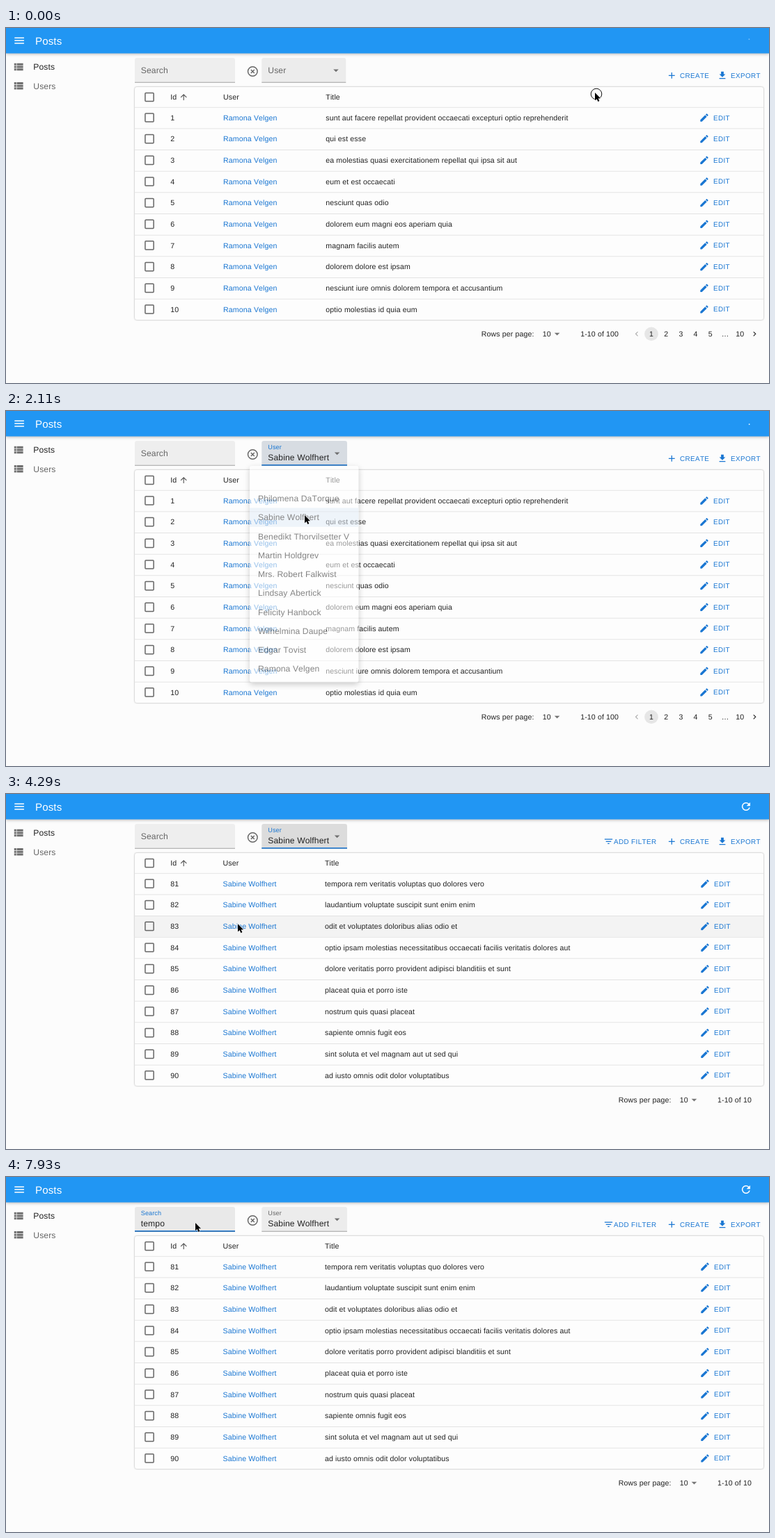
An HTML page that plays this animation: 1096x511 px, repeating every 8 s.

```html
<!DOCTYPE html>
<html lang="en">
<head>
<meta charset="utf-8">
<title>Posts list</title>
<style>
  html, body { margin: 0; width: 100%; height: 100%; overflow: hidden; background: #fcfcfc; }
  svg { display: block; width: 100%; height: 100%; }
  text { font-family: "Liberation Sans", Arial, sans-serif; fill: #212121; white-space: pre;
         text-rendering: geometricPrecision; font-kerning: none; }
  .cell { font-size: 10.6px; letter-spacing: .114px; }
  .body { font-size: 12.11px; letter-spacing: .114px; }
  .btn { font-size: 9.9px; letter-spacing: .38px; }
  .btn, .link { fill: #1976d2; }
  .muted { fill: #666; }
  .mid { text-anchor: middle; }
</style>
</head>
<body>
<svg id="stage" viewBox="0 0 1096 511" xmlns="http://www.w3.org/2000/svg"></svg>
<script>
const LOOP = 8000, BLUE = '#1976d2', ROW0 = 114.3, ROW = 30.66, ITEM = 27.25;
const FOCUS_USER = 890, PICK = 2010, LOADED = 2985, FOCUS_SEARCH = 5785;
const AUTHOR = 'Ramona Velgen', PICKED = 'Sabine Wolfhert';

const people = ['Philomena DaTorque', PICKED, 'Benedikt Thorvilsetter V', 'Martin Holdgrev',
  'Mrs. Robert Falkwist', 'Lindsay Abertick', 'Felicity Hanbock', 'Wilhelmina Daupe',
  'Edgar Tovist', AUTHOR];
const firstTitles = [
  'sunt aut facere repellat provident occaecati excepturi optio reprehenderit',
  'qui est esse', 'ea molestias quasi exercitationem repellat qui ipsa sit aut',
  'eum et est occaecati', 'nesciunt quas odio', 'dolorem eum magni eos aperiam quia',
  'magnam facilis autem', 'dolorem dolore est ipsam',
  'nesciunt iure omnis dolorem tempora et accusantium', 'optio molestias id quia eum'];
const filteredTitles = [
  'tempora rem veritatis voluptas quo dolores vero',
  'laudantium voluptate suscipit sunt enim enim', 'odit et voluptates doloribus alias odio et',
  'optio ipsam molestias necessitatibus occaecati facilis veritatis dolores aut',
  'dolore veritatis porro provident adipisci blanditiis et sunt',
  'placeat quia et porro iste', 'nostrum quis quasi placeat', 'sapiente omnis fugit eos',
  'sint soluta et vel magnam aut ut sed qui', 'ad iusto omnis odit dolor voluptatibus'];

const icons = {
  menu: 'M3 18h18v-2H3zm0-5h18v-2H3zm0-7v2h18V6z',
  refresh: 'M17.65 6.35A8 8 0 1 0 19.73 14h-2.08A6 6 0 1 1 16.22 7.78L13 11h7V4z',
  list: 'M4 14h4v-4H4zm0 5h4v-4H4zM4 9h4V5H4zm5 5h12v-4H9zm0 5h12v-4H9zM9 5v4h12V5z',
  add: 'M19 13h-6v6h-2v-6H5v-2h6V5h2v6h6z',
  save: 'M19 9h-4V3H9v6H5l7 7 7-7zM5 18v2h14v-2z',
  filter: 'M10 18h4v-2h-4zM3 6v2h18V6zm3 7h12v-2H6z',
  edit: 'M3 17.25V21h3.75L17.81 9.94l-3.75-3.75zM20.71 7.04a1 1 0 0 0 0-1.41l-2.34-2.34a1 1 0 0 0-1.41 0l-1.83 1.83 3.75 3.75z',
  up: 'M4 12l1.41 1.41L11 7.83V20h2V7.83l5.58 5.59L20 12l-8-8z',
  next: 'M10 6 8.59 7.41 13.17 12l-4.58 4.59L10 18l6-6z',
  drop: 'M7 10l5 5 5-5z'
};

const text = (x, y, s, cls, extra = '') => `<text x="${x}" y="${y}" class="${cls}" ${extra}>${s}</text>`;
const rect = (x, y, w, h, fill, extra = '') =>
  `<rect x="${x}" y="${y}" width="${w}" height="${h}" fill="${fill}" ${extra}/>`;
// Icons are centred on (x, y); size is the side of their 24-unit box.
const icon = (name, x, y, size, fill, extra = '') =>
  `<path d="${icons[name]}" fill="${fill}" ${extra} transform="translate(${x} ${y}) scale(${size / 24}) translate(-12 -12)"/>`;
const group = (id, inner, extra = '') => `<g id="${id}" ${extra}>${inner}</g>`;
const checkbox = y => rect(199.9, y - 6.1, 12.2, 12.2, 'none', 'rx="1" stroke="#666" stroke-width="1.5"');
const button = (name, ix, x, label) => icon(name, ix, 68.3, 15.1, BLUE) + text(x, 71.8, label, 'btn');
const field = (id, w, x) =>
  `<path id="${id}Bg" d="M${x} 78.6V46q0-3 3-3h${w - 6}q3 0 3 3v32.6z"/>` +
  rect(x, 77.8, w, .8, '#8f8f8f', `id="${id}Line"`) + rect(x, 77.1, w, 1.5, BLUE, `id="${id}Bar"`);

function rows(first, name, titles, userX, titleX, shift) {
  return text(userX, 103.3, 'User', 'cell') + text(titleX, 103.3, 'Title', 'cell') +
    titles.map((title, i) => {
      const y = 129 + i * ROW;
      return text(236.3, y + 3.6, first + i, 'cell') + text(userX, y + 3.6, name, 'cell link') +
        text(titleX, y + 3.6, title, 'cell') + icon('edit', 1003 + shift, y, 15.1, BLUE) +
        text(1016 + shift, y + 3.5, 'EDIT', 'btn');
    }).join('');
}
const pager = (x, range) => text(x, 444, 'Rows per page:', 'cell') + text(x + 88, 444, '10', 'cell') +
  icon('drop', x + 108.8, 440.2, 18.2, '#757575') + text(x + 142.4, 444, range, 'cell');
const pages = () => '<circle cx="927" cy="440.4" r="9.85" fill="#e6e6e6"/>' +
  ['1', '2', '3', '4', '5', '…', '10'].map((p, i) => text(927 + i * 21.2, 444, p, 'cell mid')).join('') +
  icon('next', 1075.3, 440.3, 13.6, '#222') +
  `<g transform="rotate(180 906 440.3)">${icon('next', 906, 440.3, 13.6, '#aaa')}</g>`;

const lines = Array.from({ length: 10 }, (_, i) =>
  rect(185, ROW0 - .5 + i * ROW, 903, .8, '#dedede')).join('');

document.getElementById('stage').innerHTML =
  rect(0, 0, 1096, 511, '#fcfcfc') +
  rect(0, -4, 1096, 40.5, '#2196f3', 'style="filter:drop-shadow(0 1.5px 2px rgba(0,0,0,.28))"') +
  icon('menu', 19.1, 18.1, 18.17, '#fff') +
  text(42, 23.6, 'Posts', '', 'style="font-size:15.1px;letter-spacing:.11px;fill:#fff"') +
  icon('refresh', 1063, 18, 18.17, '#fff', 'id="refresh"') + '<circle id="dot" r=".9" fill="#fff"/>' +
  icon('list', 17.8, 56, 18.17, '#6f6f6f') + text(39.3, 60.4, 'Posts', 'body') +
  icon('list', 17.8, 83.3, 18.17, '#6f6f6f') + text(39.3, 87.7, 'Users', 'body muted') +
  field('search', 144, 185) + text(0, 0, 'Search', 'body', 'id="searchLabel"') +
  text(193.8, 71.4, '', 'body', 'id="typed"') + rect(0, 60, .9, 14, '#212121', 'id="caret"') +
  '<g fill="none" stroke="#666" stroke-width="1.5"><circle cx="354.3" cy="62.5" r="6.8"/><path d="M351.8 60l5 5m0-5l-5 5"/></g>' +
  field('user', 121, 367.3) + text(0, 0, 'User', 'body', 'id="userLabel"') +
  text(376.3, 71.4, PICKED, 'body', 'id="value"') + group('arrow', icon('drop', 0, 0, 18.17, '#707070')) +
  group('addFilter', button('filter', 865.5, 873, 'ADD FILTER')) +
  button('add', 956.3, 968, 'CREATE') + button('save', 1029, 1041, 'EXPORT') +
  rect(185, 85, 903, 335, '#fdfdfd', 'rx="3" style="filter:drop-shadow(0 .9px 1px rgba(0,0,0,.36))"') +
  rect(185, 0, 903, ROW - .5, '#f3f3f3', 'id="hover"') + lines +
  [99.5, ...firstTitles.map((_, i) => 129 + i * ROW)].map(checkbox).join('') +
  text(236.3, 103.3, 'Id', 'cell') + icon('up', 255.2, 99.5, 13.6, '#555') +
  group('all', rows(1, AUTHOR, firstTitles, 312.1, 459.3, 0) + pager(682.8, '1-10 of 100') + pages()) +
  group('filtered', rows(81, PICKED, filteredTitles, 311.5, 458, 1) + pager(879.7, '1-10 of 10')) +
  group('menu',
    rect(350, 79, 156.5, 311.5, '#fff', 'rx="3" style="filter:drop-shadow(0 3px 4px rgba(0,0,0,.38))"') +
    rect(350, 85, 156.5, ITEM, '#afb4b9', 'id="blank"') + rect(350, 0, 156.5, ITEM, '#f4f4f4', 'id="item"') +
    people.map((p, i) => text(362, 130.2 + i * ITEM, p, 'body')).join('')) +
  group('cursor', '<circle id="ring" cx="2" cy="2" r="7.8" fill="none" stroke="#111"/>' +
    '<path d="M0 0V11.2L2.6 8.9 4.4 13 6.4 12.1 4.6 8.2H8.1Z" stroke="#fff" stroke-width=".9" paint-order="stroke"/>');

const el = Object.fromEntries([...document.querySelectorAll('[id]')].map(n => [n.id, n]));

// Bursts of change: start, end, steps. Between them the picture rests.
const bursts = [[0, 0, 1], [90, 700, 8], [880, 1580, 9], [1750, 2370, 8], [2640, 3420, 10],
  [3680, 4460, 10], [4550, 4730, 3], [5090, 5870, 10], [5960, 6050, 2], [6320, 6320, 1],
  [6860, 6950, 2], [7130, 7130, 1], [7300, 7390, 2], [7930, 7930, 1]];
const track = [[0, 846, 93], [700, 459, 62.5], [1150, 459, 62.5], [1580, 429, 150], [2990, 429, 150],
  [3420, 350, 124], [3590, 350, 124], [3860, 342, 102], [4113, 336, 222], [4286, 333, 187],
  [4460, 333, 187], [4730, 333, 294], [5003, 333, 294], [5700, 274, 65], [5870, 274, 65], [5960, 272, 66]];
const clicks = [[0, 90], [880, 1050], [1750, 1925], [5780, 5955]];
const keys = [6860, 6950, 7130, 7300, 7390];

const clamp = v => Math.max(0, Math.min(1, v));
const mix = (a, b, p) => a + (b - a) * p;
const span = (t, from, ms) => clamp((t - from) / ms);
const out = p => 1 - (1 - p) ** 2.7;
const within = (t, [a, b]) => t >= a && t < b;
const set = (node, attrs) => { for (const k in attrs) node.setAttribute(k, attrs[k]); };
const show = (node, on) => node.setAttribute('display', on ? 'inline' : 'none');
const tint = p => `rgb(${mix(102, 25, p)},${mix(102, 118, p)},${mix(102, 210, p)})`;

function hold(t) {
  const [start, end, n] = bursts.findLast(b => b[0] <= t);
  if (n === 1) return start;
  const step = (end - start) / (n - 1);
  return start + step * Math.min(n - 1, Math.floor((t - start + 8) / step));
}

function pointer(t) {
  const i = track.findLastIndex(k => k[0] <= t), a = track[i], b = track[i + 1] || a;
  const u = b === a ? 0 : span(t, a[0], b[0] - a[0]), p = u * u * (3 - 2 * u);
  return [mix(a[1], b[1], p), mix(a[2], b[2], p)];
}

function floatLabel(node, x, raised, active) {
  set(node, { transform: `translate(${x} ${mix(65.2, 55.3, raised)}) scale(${mix(1, .75, raised)})` });
  node.style.fill = tint(active);
}

function bar(node, x, w, p) {
  set(node, { x: x + w * (1 - p) / 2, width: w * p });
}

function draw(now) {
  const t = hold(now), [x, y] = pointer(t);
  const picked = t >= PICK, loaded = t >= LOADED;
  const userUp = out(span(t, FOCUS_USER, 200)), searchUp = out(span(t, FOCUS_SEARCH, 200));
  const userOn = userUp * (1 - searchUp), width = picked ? 122.7 : 121;

  const loading = t < 175 || (picked && !loaded);
  const angle = picked ? mix(.15, .72, span(t, PICK, 800)) : -.38;
  show(el.refresh, !loading);
  show(el.dot, loading);
  set(el.dot, { cx: 1063 + 4.8 * Math.cos(angle), cy: 18 + 4.8 * Math.sin(angle), opacity: picked ? 1 : .4 });

  floatLabel(el.searchLabel, 193.8, searchUp, searchUp);
  floatLabel(el.userLabel, 376.3, userUp, userOn);
  bar(el.searchBar, 185, 144, searchUp);
  bar(el.userBar, 367.3, width, userOn);
  set(el.searchBg, { fill: t >= 5700 ? '#e9e9e9' : '#eee' });
  set(el.searchLine, { fill: t >= 5700 ? '#333' : '#8f8f8f' });
  set(el.userBg, {
    fill: t < PICK || t >= FOCUS_SEARCH ? '#ececec' : t < 2300 ? '#d7dce2' : '#dcdcdc',
    transform: `translate(367.3 0) scale(${width / 121} 1) translate(-367.3 0)`
  });
  set(el.userLine, { width });
  show(el.value, picked);
  const open = t > FOCUS_USER && !picked;
  set(el.arrow, { transform: `translate(${picked ? 475.6 : 474} 60.9) scale(1 ${open ? -1 : 1})` });

  el.typed.textContent = 'tempo'.slice(0, keys.filter(k => t >= k).length);
  show(el.caret, within(t, [5780, 6320]) || within(t, [6860, 7930]));
  set(el.caret, { x: 193.9 + el.typed.getComputedTextLength() });

  const grow = out(span(t, FOCUS_USER, 230)), alpha = grow * (1 - span(t, PICK, 205));
  show(el.menu, alpha > 0);
  set(el.menu, {
    opacity: alpha,
    transform: `translate(428 79) scale(${mix(.75, 1, grow)} ${mix(.56, 1, grow)}) translate(-428 -79)`
  });
  const item = Math.floor((y - 85 - ITEM) / ITEM);
  show(el.blank, !picked);
  show(el.item, item >= 0);
  set(el.item, { y: 85 + ITEM * (item + 1), fill: picked ? '#e3edf8' : '#f4f4f4' });

  show(el.addFilter, t >= 2640);
  show(el.all, !loaded);
  show(el.filtered, loaded);
  const row = Math.floor((y - ROW0) / ROW);
  show(el.hover, row >= 0 && alpha === 0);
  set(el.hover, { y: ROW0 + row * ROW });

  set(el.cursor, { transform: `translate(${x} ${y})` });
  show(el.ring, clicks.some(c => within(t, c)));
}

function tick() {
  draw(performance.now() % LOOP);
  requestAnimationFrame(tick);
}
tick();
</script>
</body>
</html>
```
